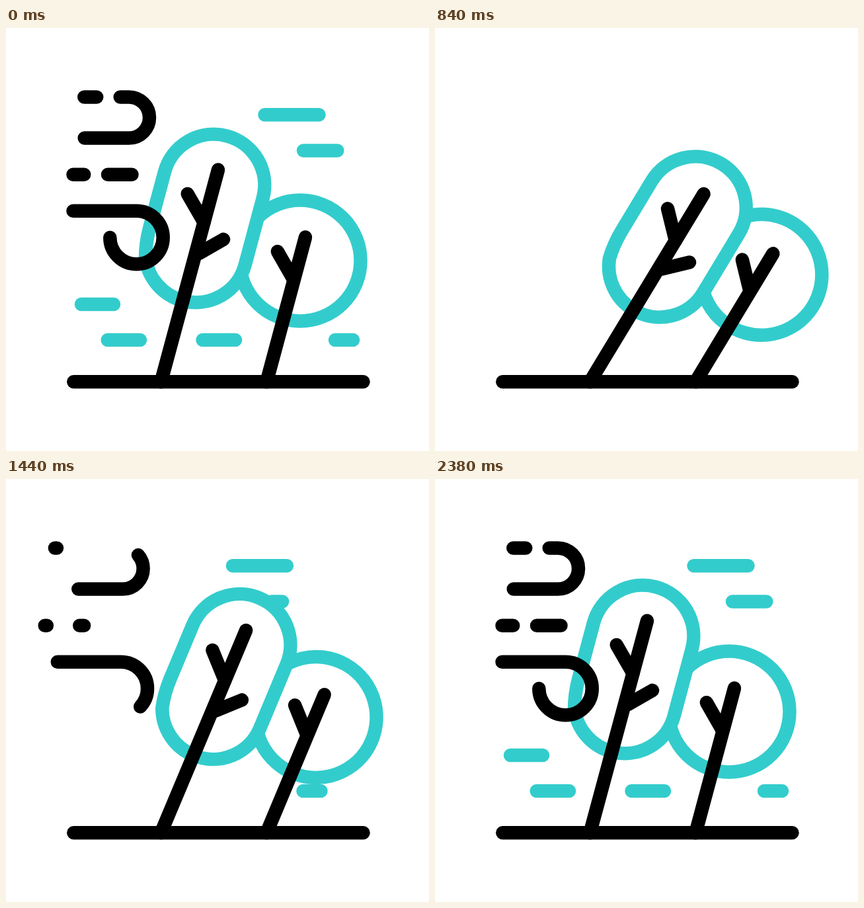
Animation, 640 px wide and 640 px high, one loop 2.4 s. Source, as an HTML page with a canvas:

```html
<!DOCTYPE html>
<html lang="en">
<head>
<meta charset="utf-8">
<title>Trees in the wind</title>
<style>
  html, body { margin: 0; width: 100%; height: 100%; overflow: hidden; background: #fff; }
  canvas { display: block; width: 640px; height: 640px; }
</style>
</head>
<body>
<canvas id="stage"></canvas>
<script>
const LOOP = 2400, WIDTH = 20.5, BLACK = '#000', TEAL = '#33cccc';
const RAD = Math.PI / 180;
const canvas = document.getElementById('stage');
const ctx = canvas.getContext('2d');
const scale = window.devicePixelRatio || 1;
canvas.width = canvas.height = 640 * scale;

// Cubic Bezier easing (.167, .167, .667, 1): even start, soft stop.
function easeOut(x) {
  if (x <= 0) return 0;
  if (x >= 1) return 1;
  const curve = (s, a, b) => 3 * (1 - s) ** 2 * s * a + 3 * (1 - s) * s * s * b + s ** 3;
  let low = 0, high = 1;
  for (let i = 0; i < 30; i++) {
    const mid = (low + high) / 2;
    if (curve(mid, 0.167, 0.667) < x) low = mid; else high = mid;
  }
  return curve(low, 0.167, 1);
}
const easeIn = x => 1 - easeOut(1 - x);
const smooth = x => x * x * (3 - 2 * x);

// Lean of the trees in degrees away from the rest pose: [time, angle].
const SWAY = [[0, 0], [680, 22.6], [1180, -4], [1720, 20.6], [2380, 0], [LOOP, 0]];
function leanAt(t) {
  const i = SWAY.findIndex(([time]) => time > t);
  const [t0, a0] = SWAY[i - 1], [t1, a1] = SWAY[i];
  return a0 + (a1 - a0) * smooth((t - t0) / (t1 - t0));
}

function dash(x0, x1, y) {
  const path = new Path2D();
  path.moveTo(x0, y);
  path.lineTo(x1, y);
  return { path, length: x1 - x0 };
}

function hook() {
  const path = new Path2D(), r = 31;
  path.moveTo(118.7, 166.6);
  path.arc(186, 135.5, r, Math.PI / 2, -Math.PI / 2, true);
  path.lineTo(172.7, 104.5);
  return { path, length: 67.3 + Math.PI * r + 13.3 };
}

function curl() {
  const path = new Path2D(), r = 40.2;
  path.moveTo(101.5, 276.8);
  path.arc(197.5, 317, r, -Math.PI / 2, Math.PI);
  return { path, length: 96 + 1.5 * Math.PI * r };
}

// Parts of a gust are drawn one after the other; enter and leave are shifts in px.
const gusts = [
  { color: TEAL, enter: 82, start: 1220, time: 700, lead: 1, leave: 72, gone: 575,
    parts: [dash(498, 525, 472), dash(391.5, 473.5, 131.3), dash(450, 501.3, 185.4),
            dash(297.5, 347, 472), dash(153.7, 203, 472), dash(114, 163, 418)] },
  { color: BLACK, enter: 42, start: 978, time: 737, lead: 1, leave: 44, gone: 612, parts: [hook()] },
  { color: BLACK, enter: 80, start: 1036, time: 775, lead: 1.12, leave: 44, gone: 612, parts: [curl()] },
  ...[[dash(118.3, 137.2, 104.5), 1345], [dash(101.5, 118.2, 221.8), 1330], [dash(154, 190.5, 221.8), 1330]]
    .map(([part, start]) => ({ color: BLACK, enter: 54, start, time: 735, lead: 1.12,
                               leave: 48, gone: 500, parts: [part] }))
];

function drawGust(gust, t) {
  let from = 0, to = 1, shift = 0;
  if (t < gust.gone) {
    from = easeIn(t / gust.gone);
    shift = gust.leave * from;
  } else {
    to = easeOut((t - gust.start) / gust.time);
    shift = -gust.enter * (1 - to) ** gust.lead;
  }
  const total = gust.parts.reduce((sum, part) => sum + part.length, 0);
  let passed = 0;
  ctx.save();
  ctx.translate(shift, 0);
  ctx.strokeStyle = gust.color;
  for (const { path, length } of gust.parts) {
    const a = Math.max(0, from * total - passed);
    const b = Math.min(length, to * total - passed);
    passed += length;
    if (b - a < 0.05) continue;
    if (a > 0 || b < length) {
      ctx.setLineDash([b - a, 5000]);
      ctx.lineDashOffset = -a;
    } else {
      ctx.setLineDash([]);
    }
    ctx.stroke(path);
  }
  ctx.restore();
}

function leaning(x, y, lean, draw) {
  ctx.save();
  ctx.translate(x, y);
  ctx.rotate(lean * RAD);
  ctx.translate(-x, -y);
  draw();
  ctx.restore();
}

function line(...points) {
  ctx.beginPath();
  points.forEach(([x, y]) => ctx.lineTo(x, y));
  ctx.strokeStyle = BLACK;
  ctx.stroke();
}

function roundCrown() {
  ctx.beginPath();
  ctx.arc(445, 352, 91.5, 0, 2 * Math.PI);
  ctx.strokeStyle = TEAL;
  ctx.stroke();
}

function longCrown() {
  const r = 77, height = 104, end = 157.6 * RAD;
  ctx.save();
  ctx.translate(314.3, 237.7);
  ctx.rotate(15 * RAD);
  ctx.beginPath();
  ctx.arc(0, 0, r, Math.PI, 0);
  ctx.arc(0, height, r, 0, end);
  ctx.bezierCurveTo(-76.3, height + 10, -r, height - 2, -r, height - 16);
  ctx.closePath();
  ctx.fillStyle = '#fff';
  ctx.fill();
  ctx.strokeStyle = TEAL;
  ctx.stroke();
  ctx.restore();
}

function render(t) {
  const lean = leanAt(t);
  const tall = draw => leaning(234.5, 535.3, lean, draw);
  const small = draw => leaning(394.3, 535.3, lean, draw);
  ctx.setTransform(scale, 0, 0, scale, 0, 0);
  ctx.fillStyle = '#fff';
  ctx.fillRect(0, 0, 640, 640);
  ctx.lineWidth = WIDTH;
  ctx.lineCap = ctx.lineJoin = 'round';

  small(roundCrown);
  tall(longCrown);
  small(() => {
    line([394.3, 535.3], [453, 316.5]);
    line([410.8, 338.2], [435, 380.5]);
  });
  tall(() => {
    line([234.5, 535.3], [321, 214.5]);
    line([274.7, 251], [299.5, 294]);
    line([329, 319.8], [292, 341]);
  });
  line([102.3, 535.3], [540.5, 535.3]);
  gusts.forEach(gust => drawGust(gust, t));
}

const began = performance.now();
function frame() {
  render((performance.now() - began) % LOOP);
  requestAnimationFrame(frame);
}
frame();
</script>
</body>
</html>
```
